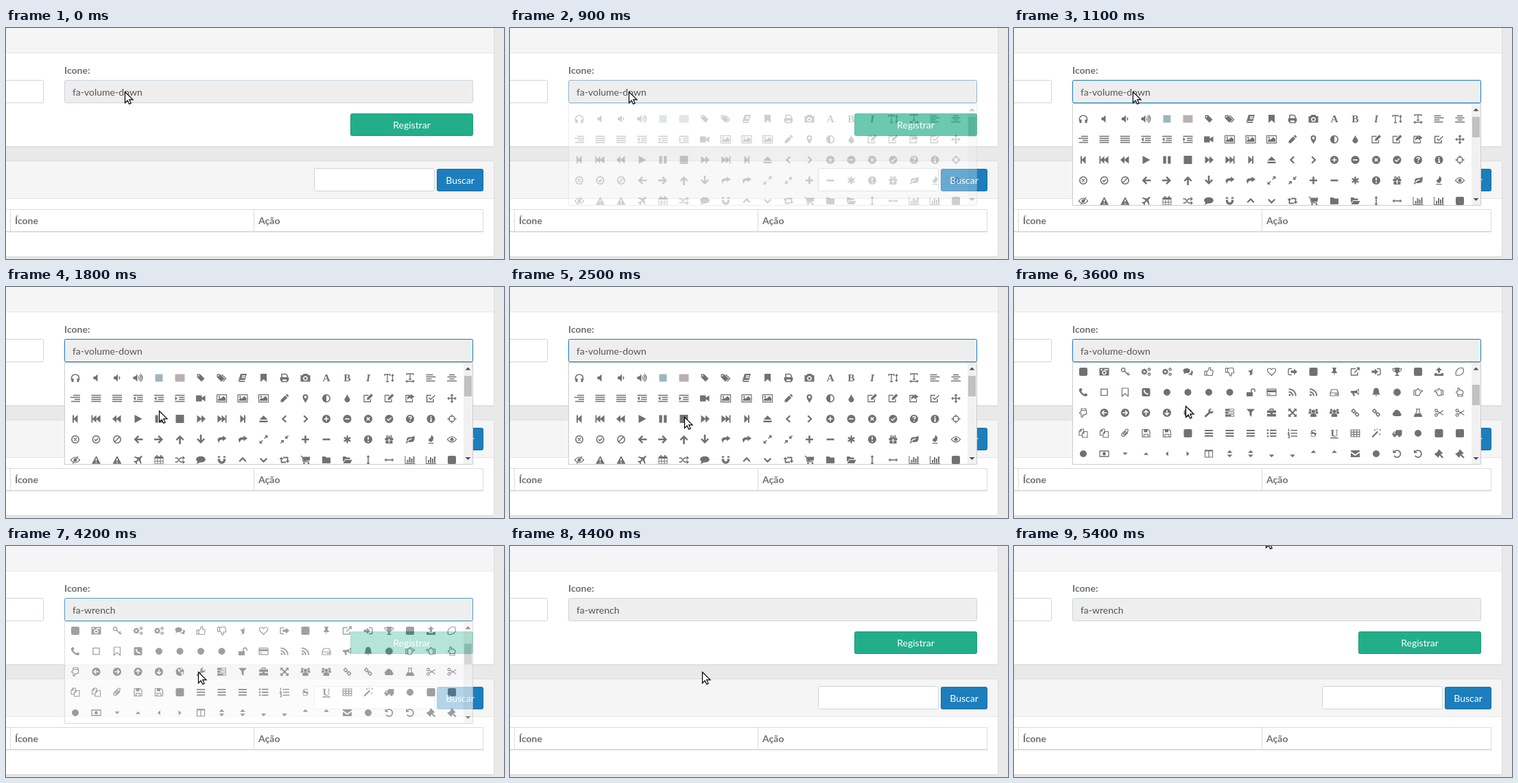
Animation, 726 px wide and 338 px high, one loop 6 s. Source, as an HTML page:

```html
<!DOCTYPE html>
<html lang="pt">
<head>
<meta charset="utf-8">
<title>Icone</title>
<style>
html, body { margin: 0; width: 100%; height: 100%; overflow: hidden; background: #e9e9e9 }
svg { display: block }
text { font: 14px Lato, sans-serif; fill: #717171 }
.bold { font-weight: bold }
.button { fill: #fff; text-anchor: middle }
.field { stroke: #cbd5dd }
.letter { font: bold 15.5px "Liberation Serif", serif; text-anchor: middle }
</style>
</head>
<body>
<svg width="726" height="338" viewBox="0 0 726 338">
  <g stroke="#dcdcdc">
    <path d="M-5-5H711.5V171.5q0 2-2 2H-5z" fill="#fff"/>
    <path d="M-5-5H711.5V36.5H-5z" fill="#f5f5f5" stroke="#e5e5e5"/>
    <path d="M711.5 0V171.5q0 2-2 2H0" fill="none"/>
    <path d="M-5 194.5H709.5q2 0 2 2V332.5q0 2-2 2H-5z" fill="#fff"/>
    <path d="M-5 195H709.5q1.5 0 1.5 2V249.5H-5z" fill="#f5f5f5" stroke="none"/>
    <path d="M0 249.5H711" stroke="#e5e5e5"/>
    <path d="M0 265.5H695.5V298M6.5 265V298M361.5 265V298" fill="none"/>
    <path d="M0 298H696" stroke-width="2"/>
  </g>
  <path d="M0 174.5H710M0 335.5H710" stroke="#e0e0e0"/>
  <rect class="field" x="-9.5" y="76.5" width="64" height="33" rx="2" fill="#fff"/>
  <rect class="field" x="85.5" y="76.5" width="595" height="33" rx="2" fill="#eee"/>
  <rect class="field" x="449.5" y="205.5" width="175" height="33" rx="2" fill="#fff"/>
  <rect x="502.5" y="125.5" width="178" height="32" rx="2" fill="#23ae8a" stroke="#1c9a78"/>
  <rect x="628.5" y="206.5" width="67" height="32" rx="2" fill="#1c7ebc" stroke="#176ca2"/>
  <text class="bold" x="85" y="67">Icone:</text>
  <text id="value" x="97" y="99" style="fill:#555"></text>
  <text class="button" x="591.5" y="147">Registrar</text>
  <text class="button" x="662" y="228">Buscar</text>
  <text class="bold" x="13" y="287">Ícone</text>
  <text class="bold" x="368" y="287">Ação</text>
  <g id="menu">
    <rect x="85.5" y="76.5" width="595" height="33" rx="2" fill="none" stroke="#177bbb"/>
    <path d="M85.5 110.5H680.5V259.5H85.5z" fill="#fff" stroke="#ccc"/>
    <svg x="86" y="111" width="581" height="148" viewBox="86 111 581 148"><g id="grid"></g></svg>
    <path d="M667 111h13v148h-13z" fill="#f1f1f1"/>
    <path d="M669.5 121.5h8l-4-4zM669.5 249h8l-4 4z" fill="#505050"/>
    <rect id="thumb" x="668" width="11" height="30" fill="#c1c1c1"/>
  </g>
  <path id="cursor" d="M.5.5v16l3.7-3.5 2.4 5.3 2.6-1.2-2.4-5.2h5.2z" fill="#fff" stroke="#000" stroke-width="1.2"/>
</svg>
<script>
const $ = id => document.getElementById(id);
const dot = (x, y, r) => `M${x} ${y - r}a${r} ${r} 0 1 0 .01 0z`;
const lines = f => [-4.5, -1.5, 1.5, 4.5].map(f).join('');
const burst = (x, y, r, R, n) => 'M' + Array.from({ length: 2 * n }, (_, i) => {
  const a = i * Math.PI / n, d = i % 2 ? r : R;
  return (x + d * Math.sin(a)).toFixed(2) + ' ' + (y - d * Math.cos(a)).toFixed(2);
}).join('L') + 'z';

const disc = dot(0, 0, 6), ring = dot(0, 0, 5.2), block = 'M-4-6h8q2 0 2 2v8q0 2-2 2h-8q-2 0-2-2v-8q0-2 2-2z';
const cross = 'M-2.3-2.3l4.6 4.6M2.3-2.3l-4.6 4.6', tick = 'M-3 0l2.2 2.2 4-4.2';
const tray = 'M3.5 1v4h-9.5v-9.5h6.5', mark = 'M-4.5-6h9v12l-4.5-4-4.5 4z';
const eye = dot(0, 0, 2.5) + '|M-6.5 0q6.5-8 13 0-6.5 8-13 0z';
const ends = 'M0-7l2.5 3h-5zM0 7l2.5-3h-5z';
const dent = 'M-7-4.5h14M-1.5-1.5h8.5M-1.5 1.5h8.5M-7 4.5h14';
const pen = 'M-2 2.2l.5-3 6-6 2.5 2.5-6 6z';

// fill | stroke | white stroke | stroke width | colour
const icons = {
  headphones: 'M-5.5 1h3v5h-3zM2.5 1h3v5h-3z|M-5.5 3V0a5.5 5 0 0 1 11 0v3',
  mute: 'M-4-2h2.5l3.5-3.5v11l-3.5-3.5h-2.5z',
  quiet: 'M-5-2h2.5l3.5-3.5v11l-3.5-3.5h-2.5z|M2.5-2q2.5 2 0 4',
  loud: 'M-7-2h2.5l3.5-3.5v11l-3.5-3.5h-2.5z|M.5-2q2.5 2 0 4M2-4q4.5 4 0 8M3.5-5.8q6 5.8 0 11.6||1.3',
  tile: 'M-5.5-5.5h11v11h-11z||||#9fb6c0',
  panel: 'M-7-5.5h14v11h-14z||||#b9b0b4',
  tag: 'M-5.5-5.5h4.5l6.5 6.5-4.5 4.5-6.5-6.5z' + dot(-3.3, -3.3, 1),
  tags: 'M-7-5.5h4.5l6.5 6.5-4.5 4.5-6.5-6.5z' + dot(-4.8, -3.3, 1) + '|M0-5l6 6-4 4.2||1.3',
  book: 'M-3-6h9l-2.5 9h-8l-.5 1.3h8.5l-.5 1.7h-7.5q-2-.5-1.5-2.5z||M-1-3h5M-1.6-.5h5',
  bookmark: mark,
  bookmarkO: `|${mark}||1.2`,
  print: 'M-6.3-1h12.6v5h-12.6z|M-4-1v-4.5h6l2 2v2.5M-4 2v3.5h8v-3.5|M-3 3.2h6',
  camera: 'M-7-4h3l1-2h6l1 2h3v9.5h-14z||' + dot(0, .8, 2.7),
  retro: 'M-7-5.5h14v11h-14z||M-5.5-3h3M0-3h5.5' + dot(0, 1.2, 2.5),
  textH: '|M-6.5-3v-2h8v2M-2.5-5v10.5M-4.5 5.5h4M5-4.5v9M3.5-3l1.5-2 1.5 2M3.5 3l1.5 2 1.5-2||1.3',
  textW: '|M-5-4v-2h10v2M0-6v8M-2 2h4M-5 5h10M-4 3.5l-2 1.5 2 1.5M4 3.5l2 1.5-2 1.5||1.3',
  left: '|M-7-4.5h10M-7-1.5h14M-7 1.5h8M-7 4.5h13',
  center: '|M-4-4.5h8M-6.5-1.5h13M-3.5 1.5h7M-7 4.5h14',
  justify: '|' + lines(y => `M-7 ${y}h14`),
  list: '|' + lines(y => `M-7 ${y}h2M-3.5 ${y}h10.5`),
  outdent: 'M-7 0l3.5-3v6z|' + dent,
  indent: 'M-3.5 0l-3.5-3v6z|' + dent,
  video: 'M-6-4.5h6.5q1 0 1 1v2.5l5-3.5v9l-5-3.5v2.5q0 1-1 1h-6.5q-1 0-1-1v-7q0-1 1-1z',
  image: 'M-5.5 3.5v-2l2.5-2.5 1.5 1.5 4-4 3 3v4z' + dot(-3.7, -2.5, 1.3) + '|M-7-5.3h14v10.6h-14z||1.2',
  pencil: 'M-5.5 5.5v-3.2l6.5-6.5 3.2 3.2-6.5 6.5zM1.8-5l1.2-1.2q.5-.3 1 0l2 2q.4.5 0 1l-1.2 1.2z',
  marker: 'M0 6.5q-4-6-4-8.5a4 4 0 0 1 8 0q0 2.5-4 8.5z' + dot(0, -2, 1.9),
  adjust: 'M0-5.5a5.5 5.5 0 0 0 0 11z|' + ring,
  tint: 'M0-6q1 2.5 2.8 5a3.9 3.9 0 1 1-5.6 0q1.8-2.5 2.8-5z',
  edit: `${pen}|${tray}||1.3`,
  shareBox: `M1-6.5l5.5 4-5.5 4v-2.3q-4 0-4.5 3-2.5-6.2 4.5-6.2z|${tray}||1.3`,
  checkBox: `|${tray}M-3-1l2.5 2.5 6.5-6`,
  linkBox: `M1.5-6.5h5v5z|${tray}M-1.5 1.5l6-6||1.4`,
  move: ends + 'M-7 0l3-2.5v5zM7 0l-3-2.5v5z|M-5 0h10M0-5v10',
  step: 'M-4-5.5h2v5l5.5-5.5v12l-5.5-5.5v5h-2z',
  fast: 'M-7-5.5h1.8v5l5.3-5v5l6-5v11l-6-5v5l-5.3-5v5h-1.8z',
  rewind: 'M-7 0l6-5.5v5l6.5-5v11l-6.5-5v5z',
  play: 'M-5-6l11 6-11 6z',
  pause: 'M-5.5-5.5h4.3v11h-4.3zM1.2-5.5h4.3v11h-4.3z',
  stop: 'M-6-6h12v12h-12z',
  block,
  eject: 'M0-5l6 6h-12zM-6 2.5h12v2.5h-12z',
  chevron: 'M-3-4l1.6-1.6 5.6 5.6-5.6 5.6-1.6-1.6 4-4z',
  plusC: disc + '||M-3.3 0h6.6M0-3.3v6.6',
  minusC: disc + '||M-3.3 0h6.6',
  timesC: `${disc}||${cross}`,
  checkC: `${disc}||${tick}`,
  helpC: disc + '||M-2-1.8q.3-1.7 2-1.7 2 0 2 1.6 0 1-1 1.5-1 .5-1 1.4M0 2.5v1.6',
  infoC: disc + '||M-1.2-.8h1.4v3.8M-1.5 3.2h3.2M0-4v1.8',
  alertC: disc + '||M0-4v4.5M0 2v2',
  arrowC: disc + '||M-3.8 0h7M0-3.2l3.2 3.2-3.2 3.2',
  aim: `|${dot(0, 0, 4.3)}M0-6.5v4M0 6.5v-4M-6.5 0h4M6.5 0h-4||1.3`,
  timesO: `|${ring}M-2-2l4 4M2-2l-4 4`,
  checkO: `|${ring}M-2.5 0l1.9 1.9 3.2-3.4`,
  ban: `|${ring}M-3.7 3.7l7.4-7.4`,
  arrow: 'M0-6l6 6-6 6-1.7-1.7 3-3h-8.3v-2.6h8.3l-3-3z',
  share: 'M1.5-5.5l5.5 4-5.5 4v-2.2q-6 0-5.5 5-6-8.5 5.5-8.6z',
  expand: 'M1.5-6h4.5v4.5zM-1.5 6h-4.5v-4.5z|M1.2-1.2l3-3M-1.2 1.2l-3 3',
  compress: 'M1-1h4.5l-4.5-4.5zM-1 1h-4.5l4.5 4.5z|M2.5-2.5l3-3M-2.5 2.5l-3 3',
  plus: 'M-1.3-5.5h2.6v4.2h4.2v2.6h-4.2v4.2h-2.6v-4.2h-4.2v-2.6h4.2z',
  minus: 'M-5.5-1.3h11v2.6h-11z',
  asterisk: '|M0-5.5v11M-4.8-2.8l9.6 5.6M4.8-2.8l-9.6 5.6||2.4',
  gift: 'M-6-2h12v3h-12zM-5 1.5h10v4.5h-10z|M0-2q-5 0-3.5-3.2 2-1 3.5 3.2 1.5-4.2 3.5-3.2 1.5 3.2-3.5 3.2|M0-1v6|1.3',
  leaf: 'M6.5-5.5q1.5 9.5-5.5 9.5-3 0-4-.5l-2 2.5-1.3-1.2 1.8-2.3q-2-5 4-6 5 0 7-2z||M-3.5 2.2q2.5-3 6-3.2',
  fire: 'M.5-6.5q4 3 3 6-.5 2-2 4h-3q-2.5-1.5-2-3.5 4-2 4-6.5zM-4 5h8v1.3h-8z',
  eye: eye + '||1.2',
  eyeOff: eye + 'M-4 5.5l8-11||1.2',
  warning: 'M0-6l6.5 11.7h-13z||M0-2v3.5M0 3v1.6',
  plane: 'M6-6q1 1-2.5 4.5l1.5 6.5-1 1-3-5.5-2.5 2.5v2.5l-1 1-1.5-2.5-2.5-1.5 1-1h2.5l2.5-2.5-5.5-3 1-1 6.5 1.5q3.5-3.5 4.5-2.5z',
  calendar: 'M-6-5h12v3h-12zM-4-7h2v2h-2zM2-7h2v2h-2z|M-6-4.5h12v10.5h-12zM-6 2h12M-2-2v8M2-2v8||1',
  random: 'M4-6l3.5 3-3.5 3zM4 0l3.5 3-3.5 3z|M-7-3h3l5 6h3M-7 3h3l5-6h3',
  comment: 'M0-5.2c9 0 9 9 0 9h-2q-1.5 1.8-4.5 1.8 1.5-1.5 1.5-3c-4-4-1-7.8 5-7.8z',
  comments: 'M-2-5c7 0 7 7 0 7h-1.5q-1 1.2-3 1.2 1-1 1-2c-3-3-1-6.2 3.5-6.2zM5-2c3 1 3 4 1 5.5 0 1 .5 1.5 1 2-2 0-3-1-3.5-1.5-1.5.2-3.5 0-4.5-.7 5 0 6.5-2.5 6-5.3z',
  magnet: '|M-4-5.5v5.5a4 4 0 0 0 8 0v-5.5|M-6-2.4h4M2-2.4h4|3.4',
  retweet: 'M-4.5-4.5l3 3.5h-6zM4.5 4.5l3-3.5h-6z|M-4.5-2v5.5h6.5M4.5 2v-5.5h-6.5||1.9',
  cart: `M-4-4.5h11l-1 5.5-8.5 1z${dot(-2, 5, 1.3)}${dot(4.5, 5, 1.3)}|M-7-5.5h2l2 8.3h8.5||1.2`,
  folder: 'M-6-5h4.5l1.5 1.5h6v8.5h-12z',
  folderO: 'M-6.5 3v-8h4l1.5 1.5h5v2.5h-7zM-3 0h10l-2.5 5h-10.5z',
  stretch: ends + '|M0-4.5v9',
  chart: 'M-4.5 0h2v4.5h-2zM-1.5-4h2v8.5h-2zM1.5-2h2v6.5h-2zM4.5-5h2v9.5h-2z|M-7-6v11.5h14.5||1.1',
  key: `|${dot(-2.8, -2.8, 2.6)}M-.8-.8l6 6M3 3l2-2M4.8 4.8l1.7-1.7||1.5`,
  cogs: burst(-2.5, 0, 3.5, 5, 8) + dot(-2.5, 0, 1.6) + burst(4.6, -3.6, 1.9, 2.8, 7) + dot(4.6, -3.6, .8) + burst(4.6, 3.6, 1.9, 2.8, 7) + dot(4.6, 3.6, .8),
  thumb: '|M-2.5-.5q3-2.5 3-5.5 3.5-.5 1.8 4h3.7v2l-1 5.5h-5l-2.5-1M-6-.8h3v6h-3z||1.2',
  halfStar: 'M2.5-5.5v9l-4 2.3.8-4.3-3.3-3 4.4-.5z',
  heart: '|M0 5.5l-5.5-5.5q-2-5 2.5-5 2 0 3 2 1-2 3-2 4.5 0 2.5 5z||1.2',
  exit: 'M2-4.5l5 4.5-5 4.5v-2.7h-4.5v-3.6h4.5z|M-1-4.5h-3.5q-1.5 0-1.5 1.5v6q0 1.5 1.5 1.5h3.5||1.4',
  enter: 'M-2-4.5l5 4.5-5 4.5v-2.7h-4.5v-3.6h4.5z|M1-4.5h3.5q1.5 0 1.5 1.5v6q0 1.5-1.5 1.5h-3.5||1.4',
  tack: 'M-3-6h6v1.2l-1 .3v3.5q2 1 2 3h-8q0-2 2-3v-3.5l-1-.3zM-.6 2h1.2l-.6 4.5z',
  trophy: 'M-3.5-6h7v4q0 3-2.5 4v2l2 1v1h-6v-1l2-1v-2q-2.5-1-2.5-4z|M-3.5-4.5h-3q.5 4 4 4.5M3.5-4.5h3q-.5 4-4 4.5||1.2',
  upload: 'M0-6.5l4.5 4.5h-3v3.5h-3v-3.5h-3zM-6.5 2h3.5v1.2h6v-1.2h3.5v4h-13z',
  lemon: '|M4.5-5.5q2.5 6-1.5 9-4 3-8.5 1.5-1.5-5 2-8.5 3.5-3 8-2z||1.2',
  phone: 'M-5-5.5q1.5-1.2 2.5 0l1 2q0 1-1.5 2 1.5 3 4.5 4.5 1-1.5 2-1.5l2 1q1.2 1 0 2.5-2 2-6-.5-4-3-5.5-6-.8-3 1-4z',
  phoneBox: block + '||M-3-3q1 5 6 6M-3-3l1.2 1.6M3 3l-1.6-1.2',
  squareO: '|M-4.7-4.7h9.4v9.4h-9.4z||1.3',
  unlock: 'M-6 0h9v6h-9z|M1 0v-2.5a2.5 2.5 0 0 1 5 0v2',
  card: 'M-6.5-3h13v3h-13z|M-6.5-4.7h13v9.5h-13zM-5 2.7h3||1.2',
  rss: dot(-4, 4, 1.6) + '|M-5.5-.5a6 6 0 0 1 6 6M-5.5-4.7a10 10 0 0 1 10.2 10.2||1.8',
  drive: dot(2, 3, .9) + dot(4.3, 3, .9) + '|M-6 1l2-5h8l2 5v4h-12zM-6 1h12||1.2',
  horn: 'M-6.5-2h4.5q4 0 7.5-3.5v9.5q-3.5-3-7-3l1 4.5h-2.5l-1.5-4.5h-2z||M4-3v4.5',
  bell: 'M0-6.5q4 .5 4 5 0 3.5 2 5h-12q2-1.5 2-5 0-4.5 4-5zM-1.5 4.2h3q-1.5 3-3 0z',
  seal: burst(0, 0, 4.6, 6.2, 12),
  hand: '|M-6-3h2.5v7h-2.5zM-3.5-2.8q2 0 3-2.5 2-.6 1.7 2.3h4q1.3 0 1.3 1.2t-1.3 1.2h-2.2q1 1 0 2 .3 1.2-.8 1.6 0 1.8-2 1.8-2.5 0-3.7-1.1||1.2',
  globe: disc + '||M-3-3.5l2.5 1.5-1 2.5M1-5l2 2.5M1 1.5l3-.5-1.5 4',
  wrench: 'M-6 4.2l5.5-5.2q-1-4 3-5.2l1.5.2-2 2 .5 2 2 .5 2-2q.5 4-3 4.7-1 .2-1.8-.2l-5.5 5.2q-1 .7-1.9-.3t-.3-1.7z',
  tasks: 'M-6.5-5.7h13v3.2h-13zM-6.5-1.6h13v3.2h-13zM-6.5 2.5h13v3.2h-13z||M0-4.1h5.5M-2 0h7.5M2 4.1h3.5',
  filter: 'M-6-5.5h12l-4.5 5v6.5l-3-2.5v-4z',
  briefcase: 'M-6.5-3.5h13v9h-13z|M-2.5-3.5v-2h5v2|M-6.5 1h5M1.5 1h5|1.3',
  arrowsAlt: 'M-6-6h4.5l-4.5 4.5zM6-6v4.5l-4.5-4.5zM6 6h-4.5l4.5-4.5zM-6 6v-4.5l4.5 4.5z|M-4-4l8 8M4-4l-8 8||2',
  users: dot(0, -1.9, 2.7) + dot(-4.6, -4, 1.8) + dot(4.6, -4, 1.8) + 'M-4.2 6q-.5-5 2.2-5h4q2.7 0 2.2 5zM-7 1.5q-.3-3.5 1.5-3.5h2q.2 1.8 1 2.5-1.5 0-2 1zM7 1.5q.3-3.5-1.5-3.5h-2q-.2 1.8-1 2.5 1.5 0 2 1z',
  link: '|M-5.3-2.8l2.5-2.5 3 3-2.5 2.5zM5.3 2.8l-2.5 2.5-3-3 2.5-2.5zM-1-1l2 2',
  cloud: 'M-4 5a3.3 3.3 0 0 1-.5-6.3 4 4 0 0 1 7.3-1.2 2.7 2.7 0 0 1 2 2.9 2.4 2.4 0 0 1-.8 4.6z',
  flask: 'M-3 1h6l2.5 4h-11z|M-1.8-5.5v4l-4 6.8h11.6l-4-6.8v-4M-3-5.5h6||1.2',
  scissors: `|${dot(-4, -3.3, 1.9)}${dot(-4, 3.3, 1.9)}M-2.5-2.2l8.8 5.4M-2.5 2.2l8.8-5.4||1.2`,
  copy: '|M-6-3l3-3h3.5v3.5M-6-3v6h4.5M-6-3h3v-3M-1.5 0l2.5-2.5h5v8.5h-7.5zM-1.5 0h2.5v-2.5||1.1',
  clip: '|M4-1l-5 5q-2 1.5-3.5 0t0-3.5l6-6q1.5-1 2.5 0t0 2.5l-5 5q-1 .5-1.4 0t0-1.3l3.6-3.6||1.2',
  save: 'M-3-5.5h5v4h-5z|M-5.5-5.5h8.5l2.5 2.5v8.5h-11zM-3 5.5v-4h6v4||1.2',
  bars: '|M-6-4h12M-6 0h12M-6 4h12||1.8',
  bullets: dot(-5.5, -4.3, 1.4) + dot(-5.5, 0, 1.4) + dot(-5.5, 4.3, 1.4) + '|M-2.5-4.3h9.5M-2.5 0h9.5M-2.5 4.3h9.5||1.9',
  numbers: '|M-2.5-4.3h9.5M-2.5 0h9.5M-2.5 4.3h9.5M-5.5-6.5v3.5M-6.5-1.3h1.5l-1.5 2.5h2M-6.5 3h1.8v3.5h-1.8||1.4',
  table: '|M-6.3-5h12.6v10h-12.6zM-6.3-1.7h12.6M-6.3 1.7h12.6M-2.1-5v10M2.1-5v10||1.2',
  magic: dot(-2, -4.7, 1) + dot(5.7, -5, .9) + dot(5.3, 1.5, 1) + dot(1.5, -6, .7) + '|M-5.7 5.5l8-8||2.3',
  truck: `M-1.5-4.8h8.5v8h-8.5zM-1.5-2.5h-3l-2.3 2.5v3.2h5.3z|${dot(-3.5, 3.8, 1)}${dot(3.5, 3.8, 1)}|M-5-.3h2.5`,
  round: dot(0, 0, 5),
  money: dot(0, 0, 2.4) + '|M-6.5-4h13v8h-13z||1.3',
  caret: 'M-3.5-1.8h7l-3.5 3.8z',
  columns: 'M-5.5-5.5h11v2h-11z|M-5.5-5h11v10h-11zM0-5v10||1.2',
  sort: 'M-3.8-1.2l3.8-4 3.8 4zM-3.8 1.2l3.8 4 3.8-4z',
  sortDown: 'M-3.8 1.2l3.8 4 3.8-4z',
  envelope: 'M-6.5-5h13v10h-13z||M-6.5-2.5l6.5 4.5 6.5-4.5',
  undo: 'M-6-6v5h5z|M-3.8-3.2a5 5 0 1 1-.5 6||1.8',
  gavel: 'M0-6.5l5.5 5.5-1.5 1.5-1-.3-3.2 3.2.3 1-1.3 1.3-5.5-5.5 1.3-1.3 1 .3 3.2-3.2-.3-1z|M1.5 1.5l4.3 4.3||2.3'
};

// A number turns the icon, ~ mirrors it
const rows = `headphones mute quiet loud tile panel tag tags book bookmark print camera A B I textH textW left center
left~ justify justify outdent outdent indent video image image image pencil marker adjust tint edit edit shareBox checkBox move
step fast rewind play pause stop rewind~ fast~ step~ eject chevron180 chevron plusC minusC timesC checkC helpC infoC aim
timesO checkO ban arrow180 arrow arrow270 arrow90 share share expand compress plus minus asterisk alertC gift leaf fire eye
eyeOff warning warning plane calendar random comment magnet chevron270 chevron90 retweet cart folder folderO stretch stretch90 chart chart block
block retro key cogs cogs comments thumb thumb180~ halfStar heart exit block tack linkBox enter trophy block upload lemon
phone squareO bookmarkO phoneBox round round round round unlock card rss rss drive horn bell seal hand hand~ hand270
hand270~ arrowC180 arrowC arrowC270 arrowC90 globe wrench tasks filter briefcase arrowsAlt users users link link cloud flask scissors scissors
copy copy clip save save block bars bars bars bullets numbers S U table magic truck round block block
round money caret caret180 caret90 caret270 columns sort sort sortDown sortDown sortDown180 sortDown180 envelope round undo undo gavel gavel`;
const letterStyle = { I: 'font-style:italic', U: 'text-decoration:underline', S: 'text-decoration:line-through' };

function icon(spec, x, y) {
  const [, name, turn, flip] = spec.match(/^([a-z]+)(\d*)(~?)$/i);
  if (name.length == 1)
    return `<text class="letter" x="${x}" y="${y + 5}" style="${letterStyle[name] || ''}">${name}</text>`;
  const [fill, line, white, width, color] = icons[name].split('|');
  const ink = color || '#717171';
  return `<g transform="translate(${x} ${y}) rotate(${turn || 0}) scale(${flip ? -1 : 1} 1)" fill="none" stroke-linejoin="round">
    <path d="${fill}" fill="${ink}" fill-rule="evenodd"/>
    <path d="${line || ''}" stroke="${ink}" stroke-width="${width || 1.6}"/>
    <path d="${white || ''}" stroke="#fff" stroke-width="1.6"/></g>`;
}
$('grid').innerHTML = rows.split('\n').map((row, r) =>
  row.split(' ').map((spec, c) => icon(spec, 101 + 30.5 * c, 133 + 30 * r)).join('')).join('');

// Pointer positions: time, x, y
const path = [[0, 173, 93], [1200, 173, 93], [1500, 190, 132], [1900, 234, 197], [2500, 254, 190], [2700, 254, 190],
  [2900, 252, 177], [3500, 252, 177], [3600, 250, 174], [3800, 256, 202], [4000, 280, 184], [4600, 280, 184],
  [5300, 367, 8], [5400, 367, -14], [6000, 367, -14]];
const ramp = (t, a, b) => Math.min(1, Math.max(0, (t - a) / (b - a)));

function draw(now) {
  const t = Math.floor(now % 6000 / 100) * 100;
  const i = path.findIndex(p => p[0] > t), [a, x, y] = path[i - 1], [b, x2, y2] = path[i];
  const k = ramp(t, a, b), scroll = 159 * ramp(t, 2800, 3100);
  $('cursor').setAttribute('transform', `translate(${Math.round(x + (x2 - x) * k)} ${Math.round(y + (y2 - y) * k)})`);
  $('grid').setAttribute('transform', `translate(0 ${-scroll})`);
  $('thumb').setAttribute('y', Math.floor(130 + scroll * .082));
  $('menu').setAttribute('opacity', ramp(t, 800, 1100) * (1 - ramp(t, 4100, 4400)));
  $('value').textContent = t < 4200 ? 'fa-volume-down' : 'fa-wrench';
  requestAnimationFrame(() => draw(performance.now() - start));
}
const start = performance.now();
draw(0);
</script>
</body>
</html>
```
